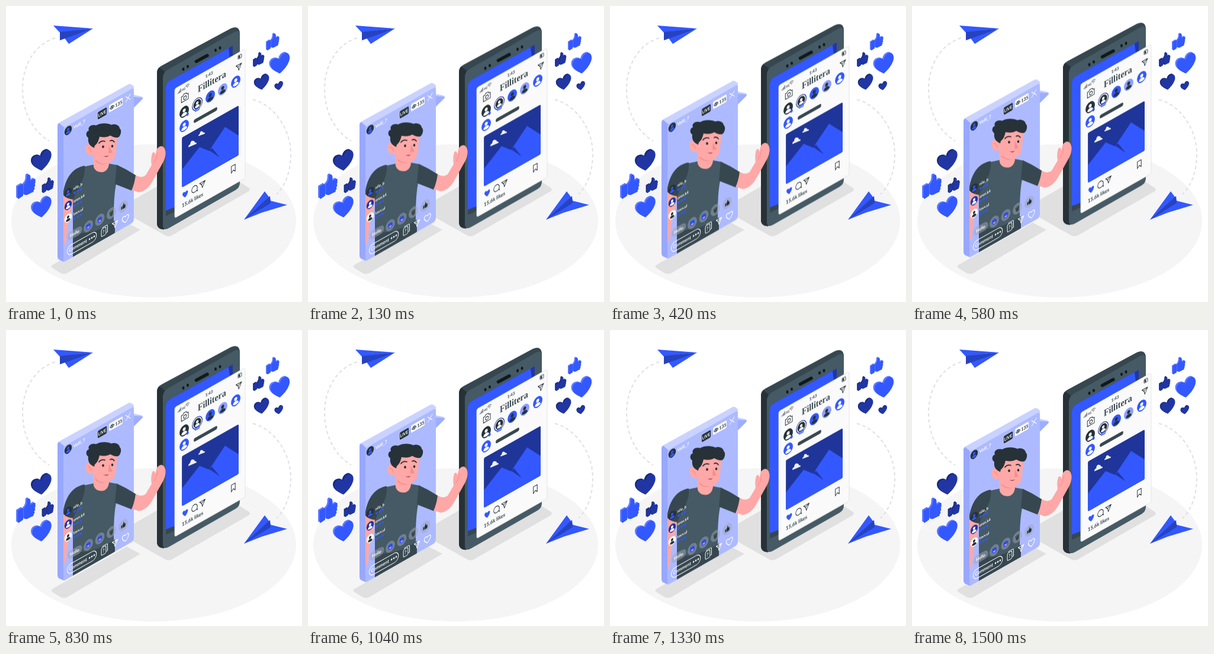
An HTML page for the animation above (1540 ms loop, 500x500 px).

```html
<!DOCTYPE html>
<html lang="en">
<head>
<meta charset="utf-8">
<title>Live stream</title>
<style>
html, body { margin: 0; width: 100%; height: 100%; overflow: hidden; background: #fff; }
svg { display: block; width: 100%; height: 100%; }
text { font-family: Lato, "Open Sans", sans-serif; font-weight: 700; }
.logo { font: 700 16px "Liberation Serif", serif; }
.blue { fill: #3358ff; }
.navy { fill: #2136a3; }
.fold { fill: #2643bf; }
.slate { fill: #455a64; }
.deep { fill: #37474f; }
.ink { fill: #263238; }
.skin { fill: #ffa8a7; }
.blush { fill: #f28f8f; }
.white { fill: #fff; }
.line { fill: none; stroke: #263238; stroke-width: 1.1; stroke-linejoin: round; stroke-linecap: round; }
.thin { stroke-width: .8; }
.pale { stroke: #fff; }
.dash { fill: none; stroke: #e0e0e0; stroke-width: 2; stroke-dasharray: 5.5 4.5; }
</style>
</head>
<body>
<svg viewBox="0 0 500 500">
  <defs>
    <path id="heart" d="M18,36 C11,33 2,28 2.500,20 C3,12 12,8 18,12.500 C19,6 24,1 29,1 C34,1.500 36,8 34,14 C31,23 25,30 18,36Z"/>
    <g id="thumb">
      <path d="M0,22 L8,17 Q10,17 10,19 L10,36 Q10,38 8,39 L2,43 Q0,43 0,41Z"/>
      <path d="M11,18 Q17,12 16,4 Q17,-1 21,1 Q24,4 22,12 L29,8 Q32,8 31,12 Q32,15 30,17 Q32,20 29,23 Q31,26 28,28 Q29,31 25,32 L17,36 Q13,37 11,35Z"/>
    </g>
    <path id="love" d="M0,5 C-9,-1 -5,-8 0,-3.500 C5,-8 9,-1 0,5Z"/>
    <path id="send" d="M-5.500,-4.500 L5.500,-4.500 L0,5 L-1.500,-.8Z M-1.500,-.8 L5.500,-4.500"/>
    <g id="user">
      <circle cy="-2.200" r="2.900"/>
      <path d="M-5.500,5.500 C-5,-.3 5,-.3 5.500,5.500 Q0,8.500 -5.500,5.500Z"/>
    </g>
    <path id="like" d="M-4,-1 h2 v5 h-2Z M-1.300,-1 Q.6,-3 .3,-5 Q2.300,-5.500 2,-1.600 H4.400 Q5,1.800 3.600,4 H-1.300Z"/>
    <clipPath id="pane"><path d="M97,205 L216,137.700 V359 Q216,364 211,367 L97,432Z"/></clipPath>
  </defs>

  <ellipse cx="249.500" cy="363" rx="240.500" ry="129.500" fill="#f5f5f5"/>
  <g fill="#e0e0e0">
    <path d="M79,437 L204,366 L227,378 L104,451 Q98,454 92,451 L79,443 Q74,440 79,437Z"/>
    <path d="M204,334 L335,259 L410,307 Q414,310 410,313 L281,387 Q275,391 268,387 L206,352Z"/>
  </g>
  <path class="dash" d="M83,54 C50,64 28,98 28,140 C28,180 46,212 73,228"/>
  <path class="dash" d="M417,158 C450,166 481,205 481,250 C481,280 472,303 457,318"/>

  <path class="blue" d="M80,33 L147,38 L91,45Z M98,53 L147,38 L106,64Z"/>
  <path class="fold" d="M91,44 L147,38 L91,58Z"/>
  <path class="blue" d="M402,361 L437,313 L446,325 L447,329 L475,336 L432,349Z"/>
  <path class="fold" d="M402,361 L446,321 L447,333Z"/>
  <g id="deco"></g>

  <g id="float">
    <path class="deep" d="M255,113 Q255,104 263,100 L380,37 Q395,31 395,47 V296 L270,376 Q255,378 255,366Z"/>
    <path class="ink" d="M255,113 Q255,106 259,103 L268,110 L267,377 Q255,376 255,366Z"/>
    <path class="slate" d="M265,121 Q265,112 273,107 L386,43 Q395,39 395,48 V297 Q395,306 388,310 L276,374 Q265,380 265,370Z"/>
    <path class="deep" d="M270,137 Q270,129 277,125 L383,66.500 V300 L270,354Z"/>
    <path class="blue" d="M270,137 Q270,129 277,125 L383,66.500 V300 L270,345Z"/>
    <path class="navy" d="M376,70.500 L383,66.500 V86 L378,87Z"/>
    <g fill="#10191d">
      <ellipse cx="299.500" cy="106" rx="2" ry="2.700"/><ellipse cx="307" cy="101.500" rx="2" ry="2.700"/>
      <ellipse cx="354" cy="74" rx="2" ry="2.700"/><ellipse cx="361.500" cy="70" rx="2" ry="2.700"/>
    </g>
    <path d="M321.500,93 L340,83" stroke="#10191d" stroke-width="5.500" stroke-linecap="round"/>

    <g id="card" transform="matrix(.866 -.49 0 1 285 139)">
      <rect width="137.400" height="218.500" rx="3" fill="#fafafa" stroke="#e0e0e0" stroke-width=".8"/>
      <path class="line thin" d="M6.500,11.500 v-1 M8.300,11.500 v-2.500 M10.100,11.500 v-4 M11.900,11.500 v-5.500"/>
      <text class="deep" x="14" y="11.500" font-size="5.500">4G</text>
      <path class="line thin" d="M21.500,6.500 q3.500,-3.500 7,0 M23,8.300 q2,-2 4,0 M25,10 v.1"/>
      <text class="deep" x="67" y="11.500" font-size="7.300" text-anchor="middle">1:43</text>
      <rect class="line thin" x="123.500" y="5" width="7" height="6" rx="1"/>
      <rect class="ink" x="124.500" y="6" width="3" height="4"/>
      <path class="line" d="M13,20.500 h3 l1.500,-2.500 h5 l1.500,2.500 h2.500 v9.500 h-13.500Z"/>
      <circle class="line" cx="20" cy="25" r="2.800"/>
      <text class="logo deep" x="72.500" y="28.500" text-anchor="middle">Fillitera</text>
      <use href="#send" class="line" x="125" y="25"/>
      <g id="stories"></g>
      <path d="M40,74 H80" stroke="#37474f" stroke-width="6" stroke-linecap="round"/>
      <rect fill="#1f3599" x="14" y="89.500" width="110.700" height="84" rx="2"/>
      <use href="#love" class="blue" transform="translate(20.500 188.500)"/>
      <path class="line" d="M42.300,192.500 A5.500,5.500 0 1 1 43.700,190.500 L44.300,194.300Z"/>
      <use href="#send" class="line" x="54" y="188.500"/>
      <path class="line" d="M110.500,185.500 h7.500 v11.500 l-3.750,-3.700 l-3.750,3.700Z"/>
      <text class="deep" x="14" y="208" font-size="8.800">15,6k likes</text>
    </g>
    <path class="blue" d="M297,276 L327,237.500 L343,244 L370,203.500 L393,218 V249 L391,252 L299,305 L297,304Z"/>
    <path class="navy" d="M343,243 L348,239 L361,255Z"/>
    <g fill="#f0f0f0">
      <path d="M308,238 Q308,234 311,233 Q312,226 316,227 Q319,227 319,230 Q322,229 322,232Z"/>
      <path d="M325,219 Q325,216 327,216 Q328,210 331,211 Q333,211 333,213 Q336,212 336,215Z"/>
    </g>

    <path fill="#9dadff" d="M214,150 L228,152.500 Q233,154 230,157 L214,173Z"/>
    <path fill="#c3cdff" d="M214,149 L228,152 Q231,153 230,154 L214,153Z"/>
    <path fill="#cad3ff" d="M87,202 Q87,197 92,195 L206,132 Q209,130 212,132 L216,135 V140 L97,207Z"/>
    <path fill="#98a8ff" d="M87,202 Q87,198 90,197 L98,204 V431.500 L90,428 Q87,426 87,422Z"/>
    <path fill="#adbaff" d="M97,209 Q97,205 101,203 L211,140 Q216,137 216,142 V359 Q216,364 211,367 L101,430 Q98,432 97,431.500Z"/>

    <g clip-path="url(#pane)">
      <path class="skin" d="M97,316 L114,322 Q110,350 103,375 L101,402 H97Z"/>
      <path class="slate" d="M130,271 L149,267 Q160,274 174,265.500 L188,268 L197,274 L186,300 Q180,330 183,390 L113,430 L113,330 Q109,290 130,271Z"/>
      <path class="deep" d="M113,383 Q150,386 184,362 V390 L113,430Z"/>
      <path class="deep" d="M133,269 C110,273 100,292 96,318 Q104,326 114,326 C119,308 135,294 133,269Z"/>
    </g>
    <path class="skin" d="M147,252 L148,271 Q151,280 162,280 Q172,279 174,267 L172,255Z"/>
    <path class="blush" d="M150,260 Q158,269 169,266 L172,258Z"/>
    <path class="skin" d="M219,285 Q229,291 236,285 L246,268 Q244,258 247,248 Q250,244 252,249 L253,251 Q253,240 259,237 Q264,234 268,240 Q272,249 266,262 L247,296 Q238,312 224,314 L210,309Z"/>
    <path d="M256,247 Q255,257 250,264" fill="none" stroke="#f28f8f" stroke-width="1"/>
    <path class="deep" d="M187,267.500 Q204,275 219,285 Q217,300 212,311 L184,300Z"/>
    <g transform="translate(0 1)">
      <path class="skin" d="M148,230 Q134,229 134,241 Q136,253 148,250 Q152,265 169,265 Q185,262 186,243 L188,221 Q170,208 152,220Z"/>
      <path class="ink" d="M147,237 C141,234 138,229 139,221 C133,217 136,209 140,209 C137,201 147,198 152,200 C160,195 173,196 178,199 C185,196 192,201 192,205 C196,208 194,216 191,219 C188,222 181,220 176,217 C169,221 162,220 158,219 C156,228 153,232 150,234 L149,238Z"/>
      <path d="M138,238 q5,0 6,7" fill="none" stroke="#f28f8f" stroke-width="1.300"/>
      <path d="M157,230 q4,-5 10,-3 M176,226 q4,-2 7,2" fill="none" stroke="#263238" stroke-width="1.800" stroke-linecap="round"/>
      <ellipse class="ink" cx="164" cy="236" rx="1.900" ry="2.300"/>
      <ellipse class="ink" cx="179.500" cy="235" rx="1.800" ry="2.200"/>
      <path class="blush" d="M174,234 L180,246 L173,247Z"/>
      <path fill="#9a4350" d="M164,251 Q169,253 173.500,250.500 Q171,256 164,251Z"/>
    </g>

    <g id="panel" transform="matrix(.866 -.49 0 1 97 205.500)">
      <text class="white" x="19.500" y="11.500" font-size="7.800">Velli_7</text>
      <rect class="ink" x="67" y="6" width="17.500" height="12.500" rx="2"/>
      <text class="white" x="75.700" y="15" font-size="7.500" text-anchor="middle">LIVE</text>
      <rect class="white" x="89" y="5" width="26.500" height="12.500" rx="2"/>
      <path class="line" d="M91,11.500 q4,-5.500 8,0 q-4,5 -8,0Z"/>
      <circle class="ink" cx="95" cy="11.300" r="1.500"/>
      <text class="ink" x="101" y="14.500" font-size="8">135</text>
      <path class="line pale" d="M121.500,6.500 l9,9 m0,-9 l-9,9"/>
      <g id="chat"></g>
      <g fill="#a0a6b5" fill-opacity=".5">
        <rect x="8" y="181.500" width="28.500" height="14" rx="7"/>
        <circle cx="48.500" cy="189.500" r="9.200"/><circle cx="71" cy="189.500" r="9.200"/>
        <circle cx="93.500" cy="189.500" r="9.200"/><circle cx="116.600" cy="189.500" r="9.200"/>
      </g>
      <text class="white" x="22" y="191.300" font-size="7.800" text-anchor="middle">Hello</text>
      <g id="faces"></g>
      <path class="deep" d="M89.500,187 l1.300,-1 1.400,3 v-4 h1.500 v3.500 l2,-3 1.500,1 -1,6.500 q-3,3.500 -5.200,0Z"/>
      <use href="#like" class="ink" transform="translate(116.600 189.500)"/>
      <rect class="line pale" x="7.500" y="204.500" width="57" height="16" rx="8"/>
      <text class="white" x="11" y="215" font-size="8">Comment</text>
      <g class="white"><circle cx="51" cy="212.500" r="1.500"/><circle cx="55.500" cy="212.500" r="1.500"/><circle cx="60" cy="212.500" r="1.500"/></g>
      <rect class="line pale" x="74" y="207.500" width="9" height="12.500" rx="2"/>
      <path class="line pale" d="M76.500,206.500 v-1 h8 q1.500,0 1.500,2 v10 h-2"/>
      <text class="white" x="78.500" y="216.500" font-size="8" text-anchor="middle">?</text>
      <use href="#send" class="line pale" x="100.500" y="212.500"/>
      <use href="#love" class="line pale" transform="translate(121 213) scale(1.150)"/>
    </g>
  </g>
</svg>
<script>
const $ = id => document.getElementById(id);
const BLUE = '#3358ff', NAVY = '#2136a3', INK = '#263238';

// A solid shape: the same outline twice, the back one shifted for depth.
const solid = (id, x, y, s, face, edge) =>
  `<g transform="translate(${x} ${y}) scale(${s})">
     <use href="#${id}" fill="${edge}" x="-1.500" y="-.5"/>
     <use href="#${id}" fill="${face}" x="1" y="1"/>
   </g>`;

const avatar = (x, y, r, back, front) =>
  `<g transform="translate(${x} ${y}) scale(${r / 9})">
     <circle r="9" fill="${back}"/><use href="#user" fill="${front}"/>
   </g>`;

const LIGHT = [BLUE, '#5f7cff'], DARK = [NAVY, '#18297d'];
$('deco').innerHTML = [
  ['heart', 443.5, 77, 1, LIGHT], ['heart', 418, 114, .74, DARK], ['heart', 453, 126.5, .42, DARK],
  ['heart', 41, 241, 1, DARK], ['heart', 41, 320, 1, LIGHT],
  ['thumb', 440, 45.5, .67, LIGHT], ['thumb', 418, 78, .57, DARK],
  ['thumb', 18.5, 283, .97, LIGHT], ['thumb', 61.5, 289.5, .6, DARK]
].map(([id, x, y, s, c]) => solid(id, x, y, s, ...c)).join('');

$('stories').innerHTML =
  avatar(18.5, 48, 9.2, INK, '#fff') +
  `<circle cx="25" cy="55.500" r="2.500" fill="${BLUE}"/>` +
  `<circle cx="44" cy="47.500" r="9.700" fill="none" stroke="${NAVY}" stroke-width="1.200"/>` +
  avatar(44, 47.5, 7.6, INK, '#fff') +
  `<rect x="39.500" y="54" width="9" height="5" rx="1" fill="${BLUE}"/>` +
  `<text x="44" y="57.900" font-size="3.500" text-anchor="middle" fill="#fff">LIVE</text>` +
  avatar(69.3, 47, 9.2, BLUE, INK) +
  avatar(93.5, 46.8, 9.2, '#8c9eff', INK) +
  avatar(119, 46.3, 9.2, BLUE, '#fff') +
  avatar(18.5, 72, 9.2, BLUE, '#fff');

const chat = [['nilo_b', INK, BLUE], ['oren.k4', NAVY, '#fff'], ['tavv.ul', '#fff', INK]];
$('chat').innerHTML = avatar(9.2, 8.5, 7.2, INK, BLUE) + chat.map(([name, back, front], i) => {
  const y = 113.5 + i * 21.5;
  const hearts = [22, 28, 34].map(x =>
    `<use href="#love" fill="${BLUE}" transform="translate(${x} ${y + 7}) scale(.42)"/>`).join('');
  return avatar(9.2, y, 7.2, back, front) +
    `<text class="white" x="19.500" y="${y + 1}" font-size="6.500">${name}</text>` + hearts;
}).join('');

$('faces').innerHTML = [48.5, 71].map(x =>
  `<circle cx="${x}" cy="189.500" r="4.800" fill="${BLUE}"/>
   <path d="M${x - 3},188 h2 m2,0 h2" stroke="${INK}" stroke-width="1.200"/>
   <path d="M${x - 2.5},190.500 h5 q-2.500,5 -5,0Z" fill="#ffa8a7"/>`).join('');

// Linear bob, 10 px up and back, at 24 pictures per second.
const LOOP = 1540, COUNT = 37, RISE = 10, REST = .7;
const bob = [];
for (let k = 0; k <= COUNT; k++) {
  const start = k && k < COUNT ? Math.round(k * 12.5 / 3) * 10 - 1 : k && LOOP;
  const y = REST - RISE * (1 - Math.abs(1 - Math.min(k, 36) / 18));
  bob.push({ offset: start / LOOP, transform: `translateY(${y}px)`, easing: 'step-end' });
}
$('float').animate(bob, { duration: LOOP, iterations: Infinity });
</script>
</body>
</html>
```
